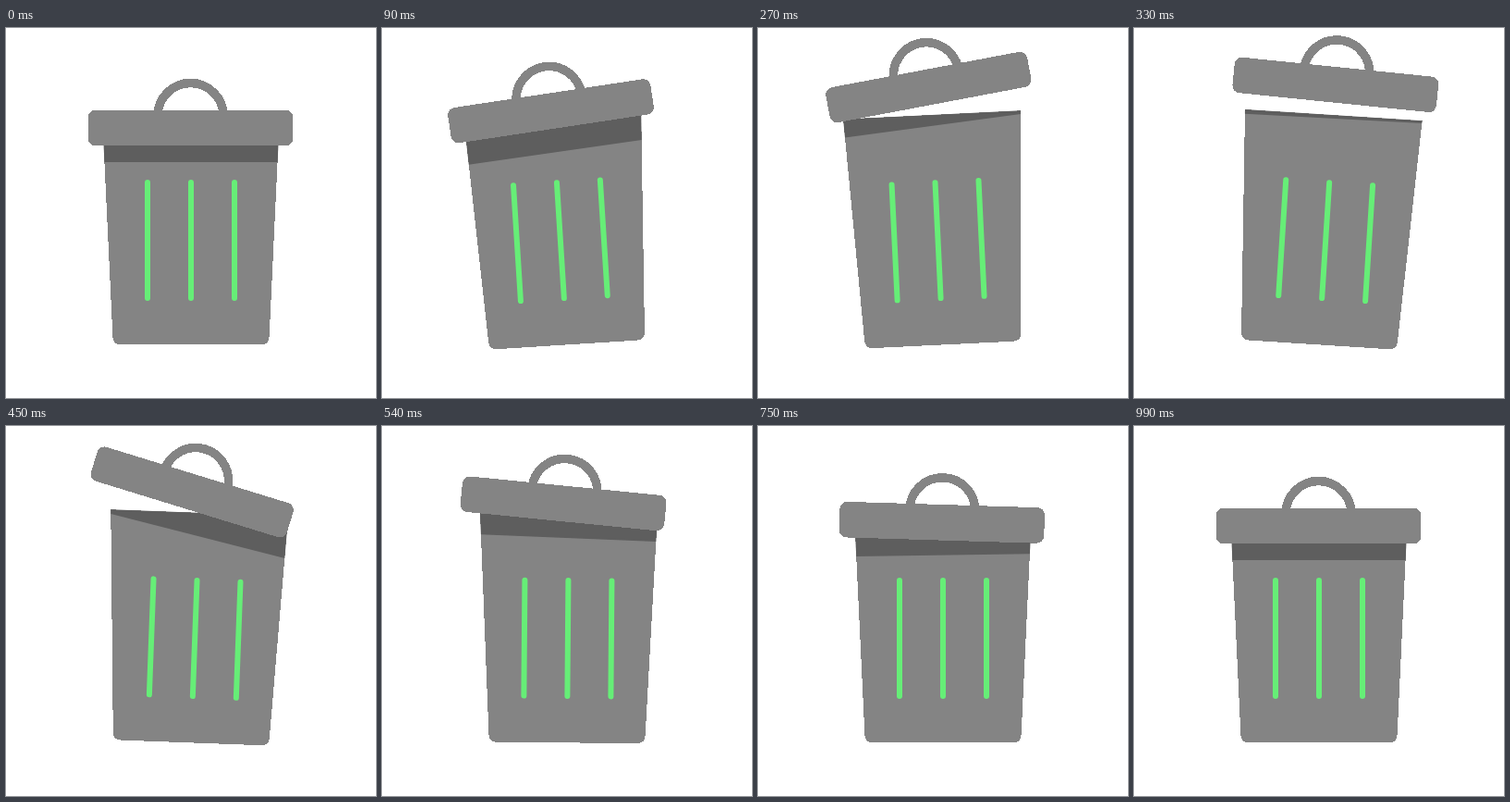
An HTML page that plays this animation: 400 by 400 pixels, repeating every 1020 ms.

```html
<!DOCTYPE html>
<html lang="en">
<head>
<meta charset="utf-8">
<title>Trash can</title>
<style>
  html, body { margin: 0; width: 100%; height: 100%; overflow: hidden; background: #fff; }
  svg { display: block; width: 100%; height: 100%; }
  .crisp { shape-rendering: crispEdges; }
</style>
</head>
<body>
<svg viewBox="0 0 400 400">
  <g id="can">
    <path class="crisp" fill="#848484" d="M104 93.7H296L284.6 334Q284.2 342.4 276 342.4H124Q115.8 342.4 115.4 334Z"/>
    <path id="shade" fill="#5e5e5e"/>
    <path stroke="#66ee77" stroke-width="6" stroke-linecap="round" d="M153 167V292M200 167V292M247 167V292"/>
    <g id="lid" class="crisp">
      <path fill="none" stroke="#848484" stroke-width="9.5" d="M-35.5 0V-13A35.5 35.5 0 0 1 35.5 -13V0"/>
      <rect x="-110.8" y="-19.3" width="221.6" height="38.6" rx="8" fill="#848484"/>
    </g>
  </g>
</svg>
<script>
const LOOP = 1020, STEP = 30;
const LID_X = 199.5, LID_Y = 108, LID_PIVOT = 12, SHADE_Y = 145;

const smooth = u => u * u * (3 - 2 * u);
const speedUp = u => u * u;
const slowDown = u => 1 - (1 - u) ** 3;
const rise = u => Math.sin(u * Math.PI / 2);
const settle = u => 1 - (1 - u ** 1.5) ** 3.7;

// A track starts at 0 and eases to each [time, value, ease] in turn.
const track = (...keys) => t => {
  let t0 = 0, v0 = 0;
  for (const [t1, v1, ease = smooth] of keys) {
    if (t < t1) return v0 + (v1 - v0) * ease((t - t0) / (t1 - t0));
    t0 = t1;
    v0 = v1;
  }
  return v0;
};

const tilt = track([210, -9.2], [330, 3.65], [600, 0]);
const lift = track([345, 47.3, rise], [990, 0, settle]);
const drift = track([330, 0], [450, -11.4], [990, 0, slowDown]);
const swing = track([210, -12.6], [440, 15.1], [620, -1.9], [760, 1.8], [990, 0]);
const gapLeft = track([330, 46.7, speedUp], [450, 46.7], [990, 0, slowDown]);
const gapRight = track([210, 46.7], [330, 48.5], [450, 5.7], [600, 29], [990, 0, slowDown]);

const $ = id => document.getElementById(id);
const can = $('can'), lid = $('lid'), shade = $('shade');

// Left side of the can at height y
const edge = y => 104 + (y - 93.7) * 0.0475;

function draw(t) {
  const l = SHADE_Y - gapLeft(t), r = SHADE_Y - gapRight(t);
  can.setAttribute('transform', `rotate(${tilt(t)} 200 342)`);
  lid.setAttribute('transform',
    `translate(${LID_X + drift(t)} ${LID_Y - lift(t)}) rotate(${swing(t)} 0 ${LID_PIVOT})`);
  shade.setAttribute('d', `M104 93.7H296L${400 - edge(r)} ${r}L${edge(l)} ${l}Z`);
}

const start = performance.now();
function tick() {
  const t = (performance.now() - start) % LOOP;
  draw(Math.floor(t / STEP) * STEP);
  requestAnimationFrame(tick);
}
tick();
</script>
</body>
</html>
```
